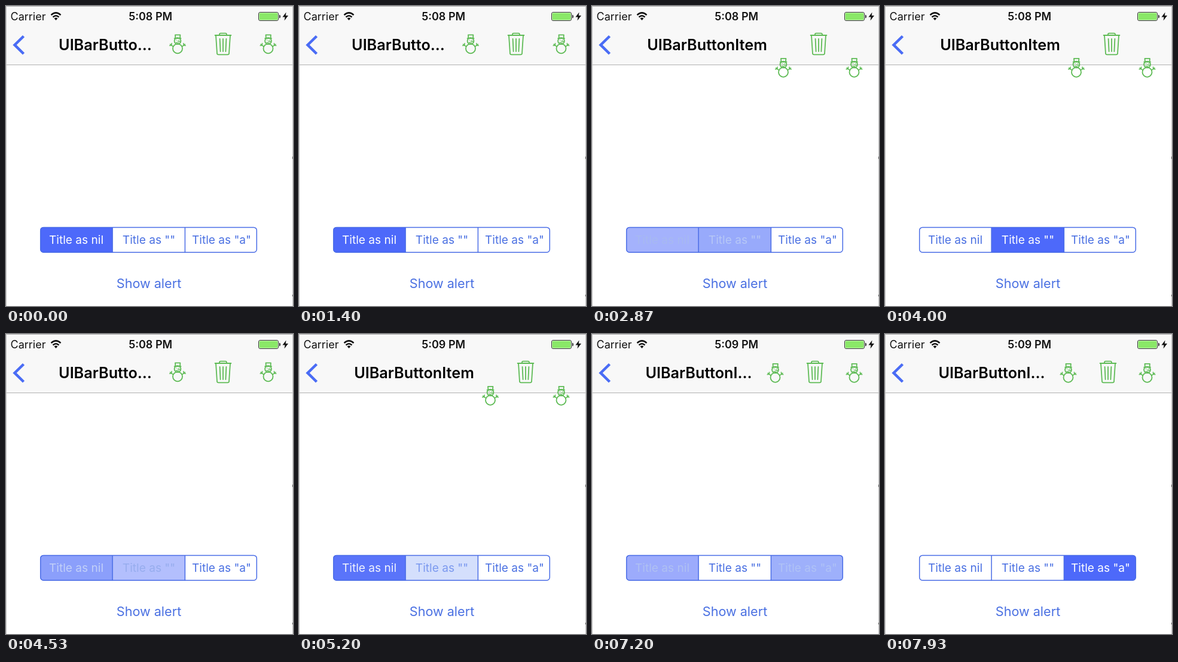
These frames come from a looping animation (480x502 px, 8000 ms). An HTML page:

```html
<!DOCTYPE html>
<html lang="en">
<head>
<meta charset="utf-8">
<title>Bar button items</title>
<style>
  :root { --blue: #4d69fa; --ink: #4a70e2; --tint: #dfe9fc; --pale: #7091ee; --green: #5ebb55; }
  html, body { margin: 0; width: 100%; height: 100%; overflow: hidden; background: #fff; }
  svg { display: block; width: 100%; height: 100%; }
  text { font-family: Inter, Roboto, sans-serif; text-anchor: middle; }
  .status { font-size: 18px; fill: #111; }
  .title { font-size: 25.2px; font-weight: 600; fill: #000; }
  .link { font-size: 21.6px; fill: var(--ink); }
  .seg text { font-size: 19.1px; fill: currentColor; }
  .icon { fill: none; stroke: var(--green); stroke-width: 1.8; stroke-linecap: round; stroke-linejoin: round; }

  /* Steps hold each state; only the cross-fades after a tap are linear. */
  .seg, .layout, .clock { animation: 8s step-end infinite; }
  .seg.nil { animation-name: segNil; }
  .seg.empty { animation-name: segEmpty; }
  .seg.letter { animation-name: segLetter; }
  .layout.nil { animation-name: showNil; }
  .layout.empty { animation-name: showEmpty; }
  .layout.letter { animation-name: showLetter; }
  .clock.before { animation-name: clockBefore; }
  .clock.after { animation-name: clockAfter; }

  @keyframes segNil {
    0% { fill: var(--blue); color: #fff; }
    33.75%, 64.6875%, 88.075% { fill: var(--blue); color: #fff; animation-timing-function: linear; }
    38.125%, 69.0625%, 92.45%, 100% { fill: #fff; color: var(--ink); }
    53.25%, 75% { fill: var(--tint); color: var(--pale); }
    54.125%, 76.1875% { fill: var(--tint); color: var(--pale); animation-timing-function: linear; }
    58.5%, 80.5625% { fill: var(--blue); color: #fff; }
  }
  @keyframes segEmpty {
    0%, 58.5%, 80.5625%, 100% { fill: #fff; color: var(--ink); }
    32%, 63.625% { fill: var(--tint); color: var(--pale); }
    33.75%, 64.6875% { fill: var(--tint); color: var(--pale); animation-timing-function: linear; }
    38.125%, 69.0625% { fill: var(--blue); color: #fff; }
    54.125%, 76.1875% { fill: var(--blue); color: #fff; animation-timing-function: linear; }
  }
  @keyframes segLetter {
    0% { fill: #fff; color: var(--ink); }
    86.75% { fill: var(--tint); color: var(--pale); }
    88.075% { fill: var(--tint); color: var(--pale); animation-timing-function: linear; }
    92.45%, 100% { fill: var(--blue); color: #fff; }
  }
  @keyframes showNil {
    0%, 54.125%, 76.1875% { visibility: visible; }
    33.75%, 64.6875%, 88.075%, 100% { visibility: hidden; }
  }
  @keyframes showEmpty {
    0%, 54.125%, 76.1875%, 100% { visibility: hidden; }
    33.75%, 64.6875% { visibility: visible; }
  }
  @keyframes showLetter {
    0% { visibility: hidden; }
    88.075%, 100% { visibility: visible; }
  }
  @keyframes clockBefore {
    0% { visibility: visible; }
    57.5%, 100% { visibility: hidden; }
  }
  @keyframes clockAfter {
    0% { visibility: hidden; }
    57.5%, 100% { visibility: visible; }
  }
</style>
</head>
<body>
<svg viewBox="0 0 480 502" preserveAspectRatio="none">
  <defs>
    <g id="snowman" class="icon">
      <path d="M-3.6 -10.6 L-4 -16.2 H4.4 L4 -10.6 M-5.4 -10.4 H5.6"/>
      <circle cy="-6" r="5.4"/>
      <circle cy="6.8" r="8"/>
      <path id="arm" d="M7.4 3.4 L12.4 -.4 M10.2 1.2 L10 -2 M10.2 1.2 L13.2 1.8" stroke-width="1.6"/>
      <use href="#arm" transform="scale(-1 1)"/>
      <path d="M-2 -7.6 h.1 M2.2 -7.6 h.1 M.2 -5.6 L4 -5 M-2.4 -3.6 Q-.4 -2 1.6 -3" stroke-width="1.4"/>
    </g>
    <g id="trash" class="icon">
      <path d="M-6 -15.2 V-16.5 Q-6 -18.4 -4 -18.4 H4 Q6 -18.4 6 -16.5 V-15.2"/>
      <path d="M-13.4 -15 H13.4 M-12 -14.8 L-10 15.5 Q-9.8 17.4 -7.5 17.4 H7.5 Q9.8 17.4 10 15.5 L12 -14.8"/>
      <path d="M-5.4 -9 L-4.4 12 M0 -9 V12 M5.4 -9 L4.4 12"/>
    </g>
    <clipPath id="pill"><rect x="57.3" y="370" width="362.2" height="42.4" rx="5"/></clipPath>
  </defs>

  <rect width="480" height="502" fill="#fff"/>
  <rect width="480" height="98" fill="#f8f8f8"/>
  <rect y="98" width="480" height="1" fill="#b0b0b0"/>
  <path d="M0 .5 H480" stroke="#aaa"/>
  <path d="M.5 0 V502 M479.5 0 V502" stroke="#c8c8c8"/>
  <path d="M479.5 252 v4 M479.5 483 v3" stroke="#555"/>

  <text class="status" x="37" y="24">Carrier</text>
  <g fill="none" stroke="#111" stroke-width="2.5">
    <path d="M75.5 15.2 Q83.5 7.6 91.5 15.2 M78.5 18.6 Q83.5 13.8 88.5 18.6"/>
    <path d="M83.5 24 L80.6 20.8 Q83.5 18.4 86.4 20.8 Z" fill="#111" stroke="none"/>
  </g>
  <g class="status" font-weight="600">
    <text class="clock before" x="241.7" y="24">5:08 PM</text>
    <text class="clock after" x="241.7" y="24">5:09 PM</text>
  </g>
  <rect x="422.5" y="10.5" width="33" height="14" rx="2.5" fill="#fff" stroke="#333"/>
  <rect x="423.5" y="11.5" width="31" height="12" rx="1.5" fill="#8ae868"/>
  <path d="M457 14.5 Q459 15 459 17.5 Q459 20 457 20.5 Z" fill="#222"/>
  <path d="M468.5 10.5 L462.5 18.5 H466.5 L465.5 24.5 L472 16 H467.7 Z" fill="#111"/>

  <path d="M29.5 50.5 L14.5 65.2 L29.5 80" fill="none" stroke="#4a6cf5" stroke-width="4.5"/>

  <g class="layout nil">
    <text class="title" x="166" y="74">UIBarButto…</text>
    <use href="#snowman" x="287" y="64.5"/>
    <use href="#trash" x="363" y="64"/>
    <use href="#snowman" x="438.5" y="64.5"/>
  </g>
  <g class="layout empty">
    <text class="title" x="192.5" y="74">UIBarButtonItem</text>
    <use href="#snowman" x="320" y="104"/>
    <use href="#trash" x="379" y="64"/>
    <use href="#snowman" x="438.5" y="104"/>
  </g>
  <g class="layout letter">
    <text class="title" x="178.5" y="74">UIBarButtonI…</text>
    <use href="#snowman" x="306.5" y="66"/>
    <use href="#trash" x="373" y="64"/>
    <use href="#snowman" x="438.5" y="66"/>
  </g>

  <g clip-path="url(#pill)">
    <g class="seg nil"><rect x="57" y="370" width="121.2" height="43"/><text x="117.5" y="398">Title as nil</text></g>
    <g class="seg empty"><rect x="178.2" y="370" width="121.2" height="43"/><text x="239" y="398">Title as ""</text></g>
    <g class="seg letter"><rect x="299.4" y="370" width="121" height="43"/><text x="360.5" y="398">Title as "a"</text></g>
  </g>
  <g fill="none" stroke="#4a6de6" stroke-width="1.5">
    <rect x="57.7" y="370.4" width="361.6" height="41.8" rx="5"/>
    <path d="M178.1 371 V412 M299.4 371 V412"/>
  </g>

  <text class="link" x="239" y="472">Show alert</text>
</svg>
</body>
</html>
```
